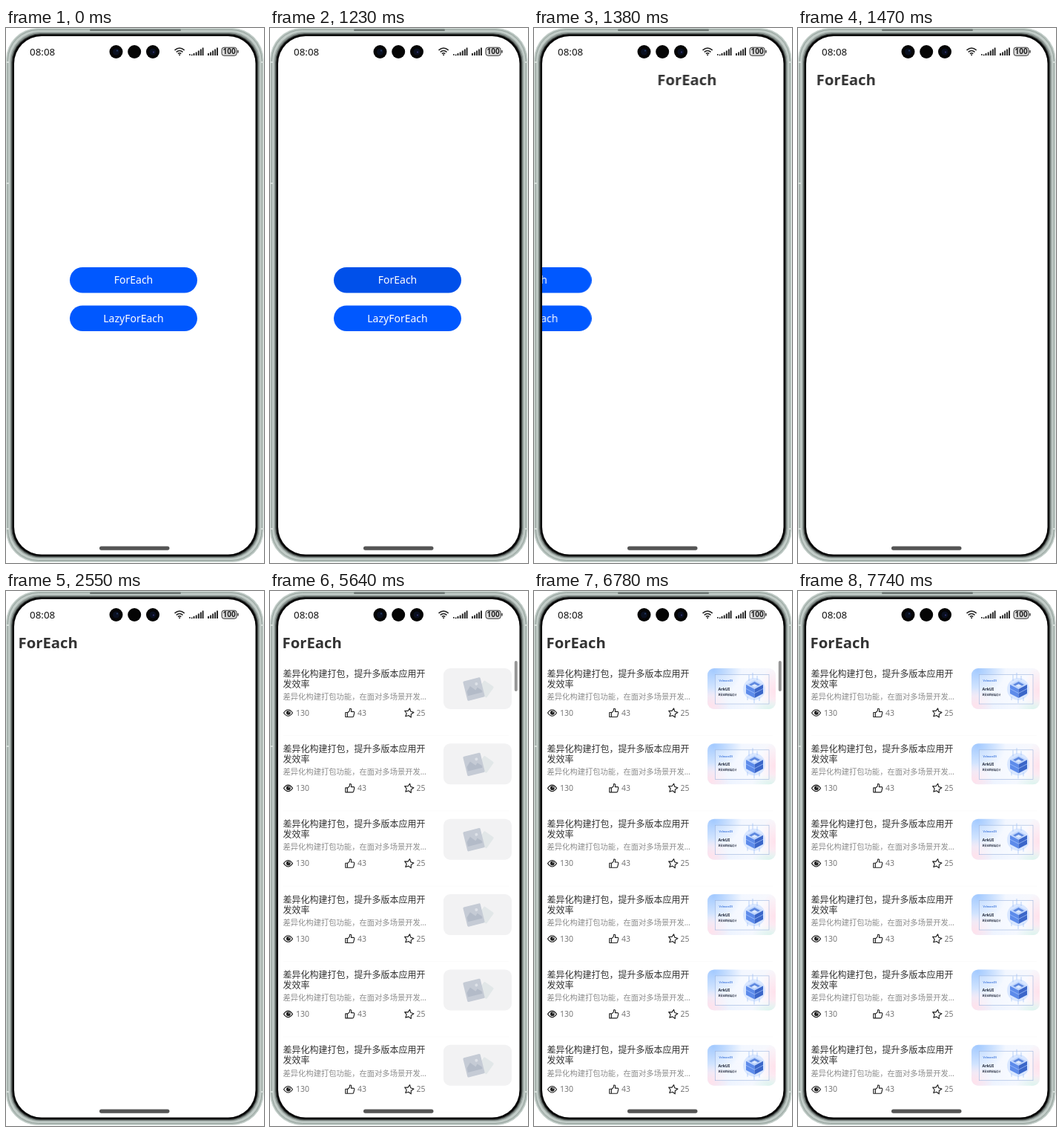
An HTML page for the animation above (8 s loop, 348 by 720 pixels).

```html
<!DOCTYPE html>
<html lang="zh-CN">
<head>
<meta charset="utf-8">
<title>ForEach</title>
<style>
  html, body { margin: 0; width: 100%; height: 100%; overflow: hidden; background: #fff; }
  svg { display: block; width: 348px; height: 720px; }
  text { font-family: "Noto Sans", "Noto Sans CJK SC", "Noto Sans CJK", sans-serif; }
  .cjk { font-family: "Noto Sans CJK SC", "Noto Sans CJK", sans-serif; }
  .dots { font-family: "Noto Sans", sans-serif; }
  .label { font-size: 14px; font-weight: 500; fill: #fff; text-anchor: middle; }
  .count { font-size: 10.5px; fill: #777; }
  .line { fill: none; stroke: #222; stroke-width: 1.15; stroke-linejoin: round; stroke-linecap: round; }

  .home, .detail, .tint, .list, .blank, .pics, .bar { animation: 8s linear infinite; }
  .home { animation-name: leave; }
  .detail { animation-name: enter; }
  .tint { opacity: 0; }
  .first { animation-name: press; }
  .second { animation-name: hover; }
  .list { animation-name: show-list; animation-timing-function: step-end; }
  .blank { animation-name: hide-blank; animation-timing-function: step-end; }
  .pics { animation-name: show-pics; animation-timing-function: step-end; }
  .bar { animation-name: fade-bar; }

  @keyframes hover {
    0%, 5.6% { opacity: 0; }
    7.5% { opacity: .05; }
    9%, 100% { opacity: 0; }
  }
  @keyframes press {
    0%, 8.6% { opacity: 0; }
    10.875%, 13.5% { opacity: .05; }
    15.375%, 16% { opacity: .08; }
    17.25%, 100% { opacity: 0; }
  }
  @keyframes leave {
    0%, 15.75% { transform: translateX(0); animation-timing-function: cubic-bezier(.4, 0, .54, 1); }
    18.75%, 100% { transform: translateX(-330px); }
  }
  @keyframes enter {
    0%, 15.75% { transform: translateX(330px); animation-timing-function: cubic-bezier(.4, 0, .54, 1); }
    18.75%, 100% { transform: translateX(0); }
  }
  @keyframes show-list { 0% { opacity: 0; } 70.5%, 100% { opacity: 1; } }
  @keyframes hide-blank { 0% { opacity: 1; } 78.75%, 100% { opacity: 0; } }
  @keyframes show-pics { 0% { opacity: 0; } 78.75%, 100% { opacity: 1; } }
  @keyframes fade-bar { 0%, 92.4% { opacity: 1; } 96.75%, 100% { opacity: 0; } }
</style>
</head>
<body>
<svg viewBox="0 0 348 720">
  <defs>
    <clipPath id="screen"><rect x="11" y="11" width="325.5" height="697.5" rx="37"/></clipPath>
    <clipPath id="card"><rect x="234" width="92" height="55" rx="9"/></clipPath>
    <linearGradient id="sky">
      <stop offset="0" stop-color="#e6effe"/>
      <stop offset=".55" stop-color="#f3f7ff"/>
      <stop offset="1" stop-color="#f8f8fc"/>
    </linearGradient>
    <radialGradient id="blue">
      <stop offset="0" stop-color="#a3caff"/>
      <stop offset="1" stop-color="#a3caff" stop-opacity="0"/>
    </radialGradient>
    <radialGradient id="pink">
      <stop offset="0" stop-color="#ffe2ec"/>
      <stop offset="1" stop-color="#ffe2ec" stop-opacity="0"/>
    </radialGradient>
    <radialGradient id="mint">
      <stop offset="0" stop-color="#dcf4ee"/>
      <stop offset="1" stop-color="#dcf4ee" stop-opacity="0"/>
    </radialGradient>

    <g id="row">
      <g fill="#333" font-size="12">
        <text class="cjk" x="17.5" y="11.5">差异化构建打包，提升多版本应用开</text>
        <text class="cjk" x="17.5" y="25.5">发效率</text>
      </g>
      <text class="cjk" x="17.5" y="41.8" font-size="10.3" fill="#8c8c8c">差异化构建打包功能，在面对多场景开发<tspan class="dots">…</tspan></text>
      <path class="line" d="M18.5 60q6-8.5 12 0q-6 8.5-12 0z"/>
      <circle cx="24.8" cy="59.8" r="2.9" fill="#222"/>
      <circle cx="25.8" cy="58.6" r=".8" fill="#fff"/>
      <path class="line" d="M101.8 59.5h2.6v6h-2.6zM104.4 60l2.8-2.6.5-3.1q2.1-.4 2.1 1.6l-.4 2.4h3.2q1.5.2 1.2 1.6l-1 4.2q-.3 1.4-1.6 1.4h-6.8"/>
      <path class="line" transform="rotate(10 187.5 60)" d="M187.5 53.8l1.9 3.9 4.3.6-3.1 3 .7 4.2-3.8-2-3.8 2 .7-4.2-3.1-3 4.3-.6z"/>
      <text class="count" x="35" y="63.5">130</text>
      <text class="count" x="118" y="63.5">43</text>
      <text class="count" x="197.5" y="63.5">25</text>
      <path d="M18 90.5h304" stroke="#fbfbfb"/>
    </g>

    <g id="blank">
      <rect x="234" width="92" height="55" rx="9" fill="#f2f2f3"/>
      <rect x="-8" y="-9" width="16" height="18" rx="1.5" fill="#e2e7e8" transform="translate(290.5 28) rotate(35)"/>
      <g transform="translate(275 28) rotate(-14)">
        <rect x="-12" y="-13.5" width="24" height="27" rx="1.5" fill="#c5cbd5"/>
        <path d="M-10 7v-6l6-6 6 7 3-3 5 5v3z" fill="#b3bbc8"/>
        <circle cx="5" cy="-6" r="2" fill="#dde1e7"/>
      </g>
    </g>

    <g id="pic" clip-path="url(#card)">
      <rect x="234" width="92" height="55" fill="url(#sky)"/>
      <ellipse cx="242" cy="2" rx="38" ry="36" fill="url(#blue)"/>
      <ellipse cx="238" cy="50" rx="26" ry="24" fill="url(#pink)"/>
      <ellipse cx="324" cy="30" rx="20" ry="32" fill="url(#pink)"/>
      <ellipse cx="318" cy="55" rx="24" ry="14" fill="url(#mint)"/>
      <rect x="244.5" y="8.5" width="72.5" height="39.5" fill="#fff" fill-opacity=".3" stroke="#9db5de" stroke-width=".6"/>
      <text x="249.5" y="18.3" font-size="3.4" font-weight="600" fill="#4f83e0">VelmoraOS</text>
      <text x="248.5" y="30" font-size="5.4" font-weight="700" fill="#1b2233">ArkUI</text>
      <text class="cjk" x="248.5" y="37" font-size="3.1" font-weight="700" fill="#2a3144">更灵动的前端设计</text>
      <circle cx="297" cy="28" r="15" fill="#d2e3ff" opacity=".8"/>
      <path d="M290 9v8M295 6v8M301 10v6M288 38v5M297 41v6M304 39v5" stroke="#9dbdf5" stroke-width=".7"/>
      <path d="M286 22l11.5-6 11.5 6-11.5 6z" fill="#c0d6fd"/>
      <path d="M290 22l7.5-4 7.5 4-7.5 4z" fill="#5f89e0"/>
      <path d="M293 23.6l4.5-2.4 4.5 2.4-4.5 2.4z" fill="#dce9ff"/>
      <path d="M286 22l11.5 6v12l-11.5-6z" fill="#5d8bea"/>
      <path d="M309 22l-11.5 6v12l11.5-6z" fill="#3b66c9"/>
      <path d="M286 27.5l11.5 6 11.5-6" fill="none" stroke="#a9c7ff" stroke-width=".7"/>
    </g>
  </defs>

  <!-- phone body, from the metal rim to the black bezel -->
  <rect width="348" height="720" fill="#fff"/>
  <rect x=".5" y=".5" width="346.5" height="718" rx="42" fill="#b4c0bb" stroke="#cfd8d4"/>
  <rect x="2.5" y="2.5" width="342.5" height="714" rx="41" fill="#c3cdc9" stroke="#98a49f"/>
  <rect x="5.5" y="5.5" width="336.5" height="708" rx="40" fill="#8b9591" stroke="#a9b4b0"/>
  <rect x="7.2" y="7.2" width="333.1" height="705" rx="39.5" fill="#4c5250"/>
  <rect x="8.6" y="8.6" width="330.3" height="702.3" rx="38" fill="#050505"/>
  <rect x="113" y="1.5" width="123" height="2.6" rx="1.3" fill="#68716e"/>
  <path d="M0 46h4M0 209h4M344 46h4M344 674h4M0 674h4" stroke="#d6deda" stroke-width="2"/>
  <rect x="11" y="11" width="325.5" height="697.5" rx="37" fill="#fff"/>

  <g clip-path="url(#screen)">
    <g class="home">
      <rect x="86" y="322" width="172" height="34.5" rx="17.25" fill="#0058ff"/>
      <rect class="tint first" x="86" y="322" width="172" height="34.5" rx="17.25"/>
      <text class="label" x="172" y="344">ForEach</text>
      <rect x="86" y="373.5" width="172" height="34.5" rx="17.25" fill="#0058ff"/>
      <rect class="tint second" x="86" y="373.5" width="172" height="34.5" rx="17.25"/>
      <text class="label" x="172" y="395.5">LazyForEach</text>
    </g>
    <g class="detail">
      <text x="16.5" y="76.5" font-size="20.3" font-weight="700" fill="#333">ForEach</text>
      <g class="list">
        <g data-item="row"></g>
        <g class="blank" data-item="blank"></g>
        <g class="pics" data-item="pic"></g>
        <rect class="bar" x="329.8" y="94" width="4" height="41" rx="2" fill="#969696"/>
      </g>
    </g>
  </g>

  <!-- status bar -->
  <text x="32" y="36.7" font-size="13.4" font-weight="500" fill="#111">08:08</text>
  <g fill="#050505">
    <circle cx="148.5" cy="32" r="9"/>
    <circle cx="173.2" cy="32" r="9"/>
    <circle cx="198" cy="32" r="9"/>
  </g>
  <g fill="#0a1020">
    <circle cx="148.5" cy="32" r="4.5"/>
    <circle cx="198" cy="32" r="4.5"/>
  </g>
  <circle cx="150" cy="30.5" r="1" fill="#2b4370"/>
  <circle cx="199" cy="32.5" r="1" fill="#3d3880"/>
  <path d="M227.5 29.8q6.6-5.6 13.2 0M229.7 32.3q4.4-3.6 8.8 0M231.9 34.6q2.2-1.7 4.4 0" fill="none" stroke="#222" stroke-width="1.6"/>
  <circle cx="234.1" cy="36.2" r="1" fill="#222"/>
  <g stroke="#222" stroke-width="1.9">
    <path d="M253.5 37v-3M256.7 37v-4.6M259.8 37v-6.5M262.8 37v-8.5M265.6 37v-10.5"/>
    <path d="M273 37v-3M276.1 37v-4.6M279.1 37v-6.5M282.1 37v-8.5M285 37v-10.5"/>
    <path d="M247 35.8h1.6M249.8 36.4h1.6" stroke-width="1.7"/>
  </g>
  <rect x="291" y="26.2" width="20.2" height="11" rx="3" fill="#dcdcdc" stroke="#333"/>
  <path d="M313 30v3.4" stroke="#333" stroke-width="1.4"/>
  <text x="301.1" y="35.4" font-size="10" font-weight="700" fill="#222" text-anchor="middle">100</text>

  <rect x="126" y="697.5" width="94.5" height="5.2" rx="2.6" fill="#555"/>
</svg>
<script>
  const ROWS = 6, TOP = 104, PITCH = 101.35;
  for (const group of document.querySelectorAll('[data-item]')) {
    for (let i = 0; i < ROWS; i++) {
      const use = document.createElementNS('http://www.w3.org/2000/svg', 'use');
      use.setAttribute('href', '#' + group.dataset.item);
      use.setAttribute('y', TOP + i * PITCH);
      group.append(use);
    }
  }
</script>
</body>
</html>
```
